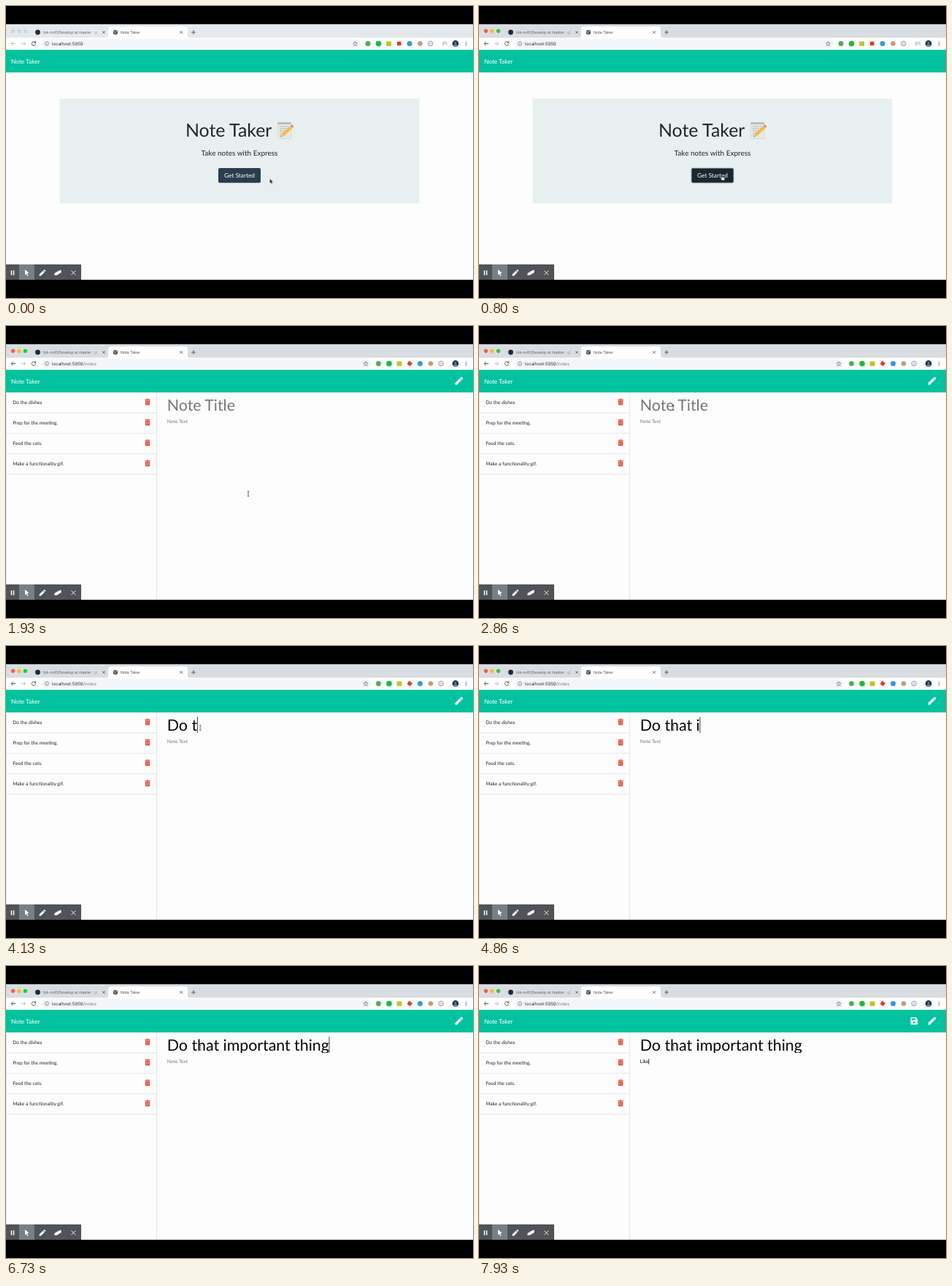
An HTML page that plays this animation: 640 px wide and 400 px high, repeating every 8 s.

```html
<!DOCTYPE html>
<html lang="en">
<head>
<meta charset="utf-8">
<title>Note Taker</title>
<style>
  html, body { margin: 0; width: 100%; height: 100%; overflow: hidden; background: #000; }
  svg { display: block; width: 640px; height: 400px; }
  text { font-family: Lato, sans-serif; white-space: pre; text-rendering: geometricPrecision; }
  .ui text { font-family: Inter, Roboto, sans-serif; }
  .line { fill: none; stroke-width: .9; stroke-linecap: round; stroke-linejoin: round; }
  .mid { text-anchor: middle; }

  .home, .app, .hover, .idle, .active, .busy, .calm, .path, .save, .arrow, .hand, .beam {
    animation: 8s step-end infinite;
  }
  .home { animation-name: home; }
  .app, .beam { animation-name: app; }
  .hover { animation-name: hover; }
  .idle { animation-name: idle; }
  .active { animation-name: active; }
  .busy { animation-name: busy; }
  .calm { animation-name: calm; }
  .path { animation-name: path; }
  .save { animation-name: save; }
  .arrow { animation-name: arrow; }
  .hand { animation-name: hand; }
  .shift { animation: shift 8s step-end infinite; }
  .pill { animation: pill 8s step-end infinite; }
  .red { animation: tilt 8s step-end infinite; transform-box: fill-box; transform-origin: center; }
  .spin { animation: spin 1s linear infinite; transform-origin: 150px 36px; }
  .pointer { animation: move 8s ease-in-out infinite; }

  @keyframes home { 0% { visibility: visible } 20.75%, 100% { visibility: hidden } }
  @keyframes app { 0% { visibility: hidden } 20.75%, 100% { visibility: visible } }
  @keyframes hover { 0% { visibility: hidden } 5% { visibility: visible } 20.75%, 100% { visibility: hidden } }
  @keyframes idle { 0% { visibility: visible } 9.75%, 100% { visibility: hidden } }
  @keyframes active { 0% { visibility: hidden } 9.75%, 100% { visibility: visible } }
  @keyframes busy { 0% { visibility: hidden } 13.4% { visibility: visible } 21.6%, 100% { visibility: hidden } }
  @keyframes calm { 0% { visibility: visible } 13.4% { visibility: hidden } 21.6%, 100% { visibility: visible } }
  @keyframes path { 0% { visibility: hidden } 13.4%, 100% { visibility: visible } }
  @keyframes save { 0% { visibility: hidden } 91.7%, 100% { visibility: visible } }
  @keyframes arrow { 0% { visibility: visible } 5%, 100% { visibility: hidden } }
  @keyframes hand { 0% { visibility: hidden } 5% { visibility: visible } 20.75%, 100% { visibility: hidden } }
  @keyframes shift { 0% { transform: none } 20.75%, 100% { transform: translateX(14.5px) } }
  @keyframes pill { 0% { width: 438px } 20.75%, 100% { width: 452px } }
  @keyframes tilt { 0% { transform: none } 13.4%, 100% { transform: rotate(35deg) } }
  @keyframes spin { to { transform: rotate(360deg) } }
  @keyframes move {
    0%, 1% { transform: translate(361.5px, 236.5px) }
    8%, 23.3% { transform: translate(333px, 231.5px) }
    33%, 100% { transform: translate(266.3px, 112px) }
  }
</style>
</head>
<body>
<svg viewBox="0 0 640 400">
  <defs>
    <linearGradient id="fade" gradientUnits="userSpaceOnUse" x1="116" x2="129">
      <stop stop-color="#5b5f64"/><stop offset="1" stop-color="#5b5f64" stop-opacity="0"/>
    </linearGradient>
    <clipPath id="field"><rect x="220" y="92" width="420" height="27"/></clipPath>
    <path id="close" class="line" d="M-1.5-1.5 1.5 1.5M1.5-1.5-1.5 1.5"/>
    <g id="globe">
      <circle cx="150" cy="36" r="3.2" fill="#4d5156"/>
      <path d="M147.5 35.2l1.6.2.9 1.2-.6 1.6M150.4 33.2l.3 1.2 1.7.5" fill="none" stroke="#fff" stroke-width=".7"/>
    </g>
    <g id="pen" fill="#fff">
      <path d="M615.6 80.4v-2.5l6.3-6.3 2.5 2.5-6.3 6.3z"/>
      <path d="M622.6 70.9l1-1q.5-.5 1 0l1.5 1.5q.5.5 0 1l-1 1z"/>
    </g>
    <g id="bin">
      <path d="M-3.6-3.7h2.1l.6-.7h1.8l.6.7h2.1v1h-7.2zM-3.1-2.2h6.2v5.6q0 .9-.9.9h-4.4q-.9 0-.9-.9z" fill="#ea4a36"/>
      <path d="M-1.5-1v4M0-1v4M1.5-1v4" stroke="#f9b9b0" stroke-width=".55"/>
    </g>
  </defs>

  <rect width="640" height="400"/>
  <rect y="25" width="640" height="350" fill="#fdfdfd"/>

  <g class="ui">
    <rect y="25" width="640" height="19" fill="#d9dde2"/>
    <rect class="idle" y="25" width="640" height="19" fill="#e5e9eb"/>
    <g class="idle" fill="#d0d3d6">
      <circle cx="9.5" cy="34.3" r="2.7"/><circle cx="18" cy="34.3" r="2.7"/><circle cx="26.5" cy="34.3" r="2.7"/>
    </g>
    <g class="active">
      <circle cx="9.5" cy="34.3" r="2.7" fill="#fb5b54"/>
      <circle cx="18" cy="34.3" r="2.7" fill="#f9bc2f"/>
      <circle cx="26.5" cy="34.3" r="2.7" fill="#2ac940"/>
    </g>

    <circle cx="43.5" cy="36" r="3.4" fill="#24292e"/>
    <text x="51" y="38" font-size="5.2" fill="url(#fade)">tzk-m41/Develop at master · gi</text>
    <use href="#close" x="134" y="36" stroke="#5f6368"/>
    <path d="M136.500 44q3.500 0 3.500-3.500v-9q0-3.500 3.500-3.500h102q3.500 0 3.500 3.500v9q0 3.500 3.500 3.500z" fill="#fefefe"/>
    <g class="calm"><use href="#globe"/></g>
    <g class="busy"><path class="spin line" d="M146.700 35.200a3.400 3.400 0 0 0 4.800 3.900" stroke="#3b7de8"/></g>
    <text x="157" y="38" font-size="5.2" fill="#45494d">Note Taker</text>
    <use href="#close" x="240.200" y="36" stroke="#5f6368"/>
    <path class="line" d="M254.500 36h5M257 33.500v5" stroke="#4d5156"/>

    <rect y="43.500" width="640" height="16.500" fill="#fefefe"/>
    <rect class="pill" x="48" y="45.300" width="438" height="12.500" rx="6.250" fill="#f3f5f6"/>
    <g class="idle line" stroke="#b4b7ba">
      <path d="M12.700 51.500h-5.400M9.700 49l-2.500 2.500 2.500 2.500"/>
      <path d="M40.300 50a2.700 2.700 0 1 0 .3 2.300M40.600 48.700v1.700h-1.700"/>
    </g>
    <path class="active line" d="M12.700 51.500h-5.400M9.700 49l-2.500 2.500 2.500 2.500" stroke="#4d5156"/>
    <path class="line" d="M21.300 51.500h5.400M24.300 49l2.500 2.500-2.500 2.500" stroke="#b8bbbe"/>
    <g class="active"><path class="calm line" d="M40.300 50a2.700 2.700 0 1 0 .3 2.300M40.600 48.700v1.700h-1.700" stroke="#4d5156"/></g>
    <path class="busy line" d="M36 49.400l4.200 4.200M40.200 49.400l-4.200 4.200" stroke="#4d5156"/>
    <circle cx="56" cy="51.500" r="2.700" fill="none" stroke="#5f6368" stroke-width=".6"/>
    <path d="M56 51.200v1.800M56 49.800v.6" stroke="#5f6368" stroke-width=".7"/>
    <text x="63" y="53.700" font-size="6.1" fill="#26292c">localhost:5050<tspan class="path" fill="#777b80">/notes</tspan></text>

    <g class="shift">
      <path class="line" d="M478.500 48.700l.9 1.900 2.100.3-1.500 1.500.3 2.100-1.800-1-1.800 1 .3-2.100-1.500-1.500 2.100-.3z" stroke="#5f6368" style="stroke-width:.7"/>
      <circle cx="496" cy="51.500" r="3.500" fill="#58a75a"/>
      <circle cx="510.500" cy="51.500" r="3.800" fill="#18b83d"/>
      <rect x="521.200" y="48.500" width="6.800" height="6.300" fill="#b9c928"/>
      <rect class="red" x="536" y="48.800" width="5.500" height="5.300" fill="#e0392f"/>
      <circle cx="553" cy="51.500" r="3.500" fill="#3999d6"/>
      <circle cx="567.500" cy="51.500" r="3.300" fill="#c79a78"/>
      <circle cx="581.700" cy="51.500" r="3.300" fill="none" stroke="#686b6f" stroke-width=".7"/>
      <text class="mid" x="581.700" y="53" font-size="4" fill="#686b6f">{}</text>
    </g>
    <path class="home line" d="M598 49.500h5M598 51.400h5M598 53.300h2.700M604 49.500v4" stroke="#a2a5a8" style="stroke-width:.8"/>
    <circle cx="616" cy="51.500" r="4.400" fill="#24354a"/>
    <path d="M613 54.700q.5-2.200 3-2.200t3 2.200q-3 2-6 0z" fill="#6d87a6"/>
    <circle cx="616" cy="50.600" r="1.400" fill="#6d87a6"/>
    <g fill="#4d5156"><circle cx="630.500" cy="49.300" r=".65"/><circle cx="630.500" cy="51.500" r=".65"/><circle cx="630.500" cy="53.700" r=".65"/></g>
  </g>

  <rect y="60" width="640" height="31" fill="#01c29e"/>
  <text x="7" y="78.500" font-size="8.330" fill="#fff">Note Taker</text>

  <g class="home">
    <rect x="73.500" y="127" width="493" height="143.500" rx="1.500" fill="#e8f0ef"/>
    <text x="246" y="179.300" font-size="24.890" fill="#212529">Note Taker</text>
    <g>
      <rect x="372.300" y="159.500" width="18.500" height="22" rx="1" fill="#e9e9e4" stroke="#c4c5c1" stroke-width=".5"/>
      <path d="M372.300 160.500q0-1 1-1h16.500q1 0 1 1v1.600h-18.500z" fill="#b7b9b8"/>
      <path d="M375 165h13M375 168h12M375 171h8M375 174h6M375 177h7" stroke="#a3a6a6" stroke-width=".9" stroke-dasharray="2.500 .7"/>
      <path d="M376.500 179.500l1.300-4.300 3 2.700z" fill="#e9c79a"/>
      <path d="M376.500 179.500l.5-1.500.9.900z" fill="#333"/>
      <path d="M377.800 175.200l11.200-10.500 3 3-11.200 10.200z" fill="#f7b52c"/>
      <path d="M379.300 176.600l11.200-10.400" stroke="#fbd466" stroke-width="1"/>
      <path d="M389 164.700l1-1 3 3-1 1z" fill="#b6bcc0"/>
      <path d="M390 163.700l.8-.7q1.200-.6 2.400.6t.7 2.200l-.9.900z" fill="#ee7778"/>
    </g>
    <text class="mid" x="320" y="205.200" font-size="10" fill="#212529">Take notes with Express</text>
    <rect x="291" y="222" width="58" height="20.300" rx="2" fill="#293c50"/>
  </g>
  <rect class="hover" x="291" y="222" width="58" height="20.300" rx="2" fill="#1a2731" stroke="#aeb9bf" stroke-width=".9"/>
  <text class="home mid" x="320" y="235.100" font-size="8.330" fill="#fff">Get Started</text>

  <g class="app">
    <use href="#pen"/>
    <g class="save">
      <path d="M591.500 71.300q0-1 1-1h6.200l2.400 2.400v6.600q0 1-1 1h-7.600q-1 0-1-1z" fill="#fff"/>
      <path d="M593 71.700h5v2.500h-5z" fill="#01c29e"/>
      <circle cx="596.300" cy="77.200" r="1.500" fill="#01c29e"/>
    </g>
    <path d="M.5 91v284M206.500 91v284" stroke="#dedfe0" stroke-width=".8"/>
    <g id="list" font-size="6.670" fill="#212529"></g>
    <g clip-path="url(#field)"><text id="head" x="220.800" y="115.500" font-size="21.330"></text></g>
    <text id="body" x="220.800" y="133.200" font-size="6.670"></text>
    <rect id="caret" width=".8" fill="#111"/>
  </g>

  <g>
    <rect y="354" width="103" height="21" fill="#525355"/>
    <rect x="18" y="354" width="21" height="21" fill="#7d7e80"/>
    <g fill="#fff">
      <path d="M6.700 362.300h1.500v6.400h-1.500zM9.800 362.300h1.500v6.400h-1.500z"/>
      <path d="M26 361l5.700 5-2.700.2 1.600 3.200-1.300.6-1.500-3.200-1.800 1.700z"/>
      <path d="M45.700 369.700v-2.100l5-5 2.100 2.100-5 5zM51.300 362l.9-.9q.3-.3.700 0l1.400 1.400q.3.300 0 .7l-.9.900z"/>
      <path d="M66.500 366.200l8-4.700v3.300l-8 4.700zM66.500 366.200l2.500-1.700 5.500-3 1.200.8v2.600l-6.200 4z"/>
    </g>
    <path class="line" d="M89.700 362.700l5.400 5.400M95.100 362.700l-5.400 5.400" stroke="#fff"/>
  </g>

  <g class="pointer">
    <path class="arrow" d="M0 0v6.600l1.500-1.400 1.100 2.500 1.200-.5-1.100-2.500h2z" fill="#111" stroke="#fff" stroke-width=".5"/>
    <path class="hand" d="M-.7.500q.7-.9 1.300 0v2.500l2.800.7q.7.300.6 1l-.5 2.600h-3.700l-2.100-2.900q0-.8.8-.6l.8.700z" fill="#fff" stroke="#111" stroke-width=".6"/>
    <path class="beam" d="M-1.200-3.600q1.200 0 1.200.9v5.400q0 .9-1.200.9M1.200-3.600q-1.200 0-1.200.9M0 2.700q0 .9 1.200.9" fill="none" stroke="#222" stroke-width=".7"/>
  </g>
</svg>
<script>
  const $ = id => document.getElementById(id);
  const notes = ['Do the dishes', 'Prep for the meeting.', 'Feed the cats.', 'Make a functionality gif.'];
  $('list').innerHTML = notes.map((note, i) => {
    const y = 28 * i;
    return `<text x="9.200" y="${107.3 + y}">${note}</text>
      <use href="#bin" x="194" y="${104 + y}"/>
      <path d="M0 ${119 + y}H206.500" stroke="#dedfe0" stroke-width=".8"/>`;
  }).join('');

  const LOOP = 8000, FOCUS = 3070, TAB = 6930;
  const title = 'Do that important thing', text = 'Like';
  const bodyKeys = [7330, 7530, 7660, 7800];
  const titleKeys = [3600, 3730, 3800, 4060];
  for (let i = 0; titleKeys.length < title.length; i++) titleKeys.push(4230 + 133 * i);

  const count = (keys, t) => keys.filter(k => k <= t).length;

  function type(el, full, n, hint) {
    el.textContent = n ? full.slice(0, n) : hint;
    el.setAttribute('fill', n ? '#050505' : '#777');
    return n ? el.getComputedTextLength() : 0;
  }

  function place(x, y, h) {
    const c = $('caret');
    c.setAttribute('x', x);
    c.setAttribute('y', y);
    c.setAttribute('height', h);
  }

  let start;
  function draw(now) {
    start ??= now;
    const t = (now - start) % LOOP;
    const headW = type($('head'), title, count(titleKeys, t), 'Note Title');
    const bodyW = type($('body'), text, count(bodyKeys, t), 'Note Text');
    if (t < TAB) place(220.6 + headW, 97, 22);
    else place(220.6 + bodyW, 127, 7.5);
    $('caret').setAttribute('opacity', t < FOCUS ? 0 : 1);
    requestAnimationFrame(draw);
  }
  requestAnimationFrame(draw);
</script>
</body>
</html>
```
